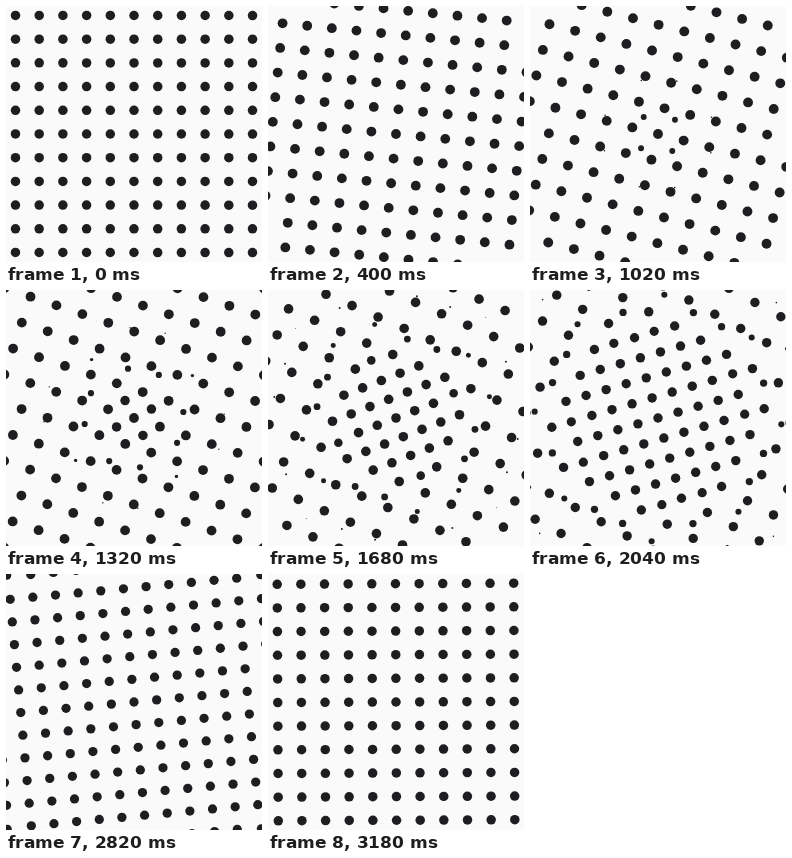
Animation of 256x256 px, one loop 3.2 s. Source, as an HTML page with a canvas:

```html
<!DOCTYPE html>
<html>
<head>
<meta charset="utf-8">
<style>
html, body { margin: 0; width: 100%; height: 100%; overflow: hidden; background: #fafafa; }
canvas { display: block; width: 256px; height: 256px; }
</style>
</head>
<body>
<canvas width="256" height="256"></canvas>
<script>
const ctx = document.querySelector('canvas').getContext('2d');
const LOOP = 3200, GAP = 23.7, RADIUS = 4.75, N = 8;

const smooth = x => {
  x = Math.min(1, Math.max(0, x));
  return x * x * (3 - 2 * x);
};

function dot(dist, angle, r) {
  if (r <= 0) return;
  ctx.beginPath();
  ctx.arc(128 + dist * Math.cos(angle), 128 + dist * Math.sin(angle), r, 0, 7);
  ctx.fill();
}

function draw(t) {
  const zoom = 2 ** (t / 2), gap = GAP * zoom, turn = t * Math.PI / 4;
  const size = RADIUS * zoom * (1 - (1 - Math.SQRT1_2) * smooth(t));
  ctx.fillStyle = '#fafafa';
  ctx.fillRect(0, 0, 256, 256);
  ctx.fillStyle = '#1e1e20';
  for (let i = -N; i <= N; i++) {
    for (let j = -N; j <= N; j++) {
      dot(gap * Math.hypot(i, j), Math.atan2(j, i) + turn, size);

      // Cell centres fill in from the middle, spiralling inwards as they grow.
      const x = i + 0.5, y = j + 0.5, d = Math.hypot(x, y);
      const p = smooth((t - 0.1 * d - 0.09) / 0.28);
      const spread = 1 + (0.5 - 0.06 * d) * (1 - p);
      const twist = Math.max(0, 20.5 - 4 * d) * (1 - p ** 1.5) * Math.PI / 180;
      dot(gap * d * spread, Math.atan2(y, x) + turn - twist, size * p);
    }
  }
}

function frame() {
  draw(performance.now() % LOOP / LOOP);
  requestAnimationFrame(frame);
}
frame();
</script>
</body>
</html>
```
